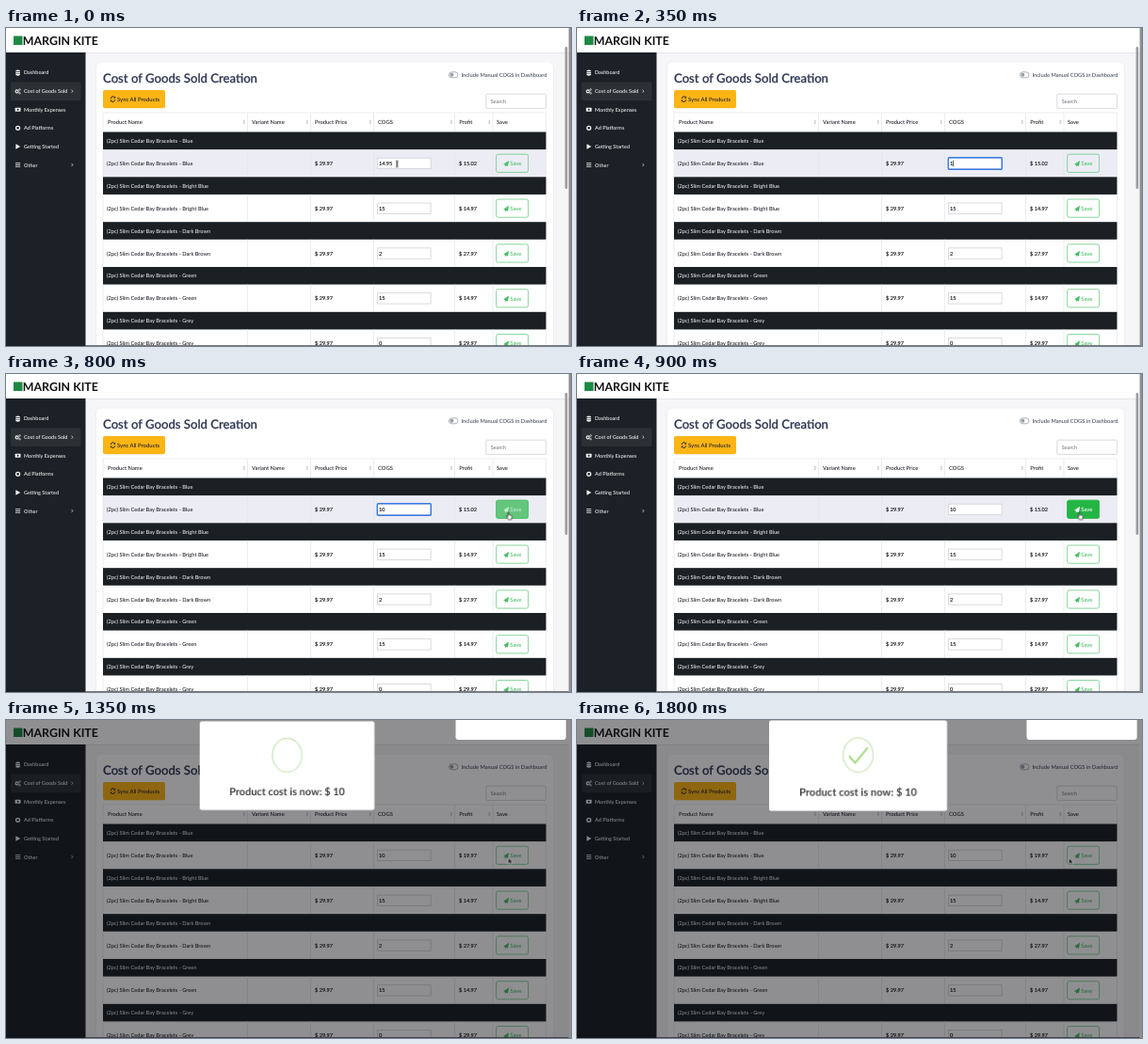
Recreate the animation shown at these times as an HTML page. Size 600x338 px, loop 1850 ms.

```html
<!DOCTYPE html>
<html lang="en">
<head>
<meta charset="utf-8">
<title>Cost of Goods Sold Creation</title>
<style>
  html, body { margin: 0; width: 100%; height: 100%; overflow: hidden; background: #fff; }
  svg { display: block; width: 100vw; height: 100vh; }
  text { font: 500 5.68px Lato, "Open Sans", sans-serif; fill: #1b1e26; text-rendering: geometricPrecision; white-space: pre; }
  .logo { font-size: 12.4px; font-weight: 700; fill: #111; }
  .title { font-size: 13.15px; fill: #2b3450; stroke: #2b3450; stroke-width: .25; }
  .nav text { font-size: 5.5px; fill: #f4f5f6; }
  .head text { font-size: 5.8px; }
  .band { fill: #1b2024; }
  text.group { fill: #e9eaec; }
  .field { fill: #fff; stroke: #cfd1d6; stroke-width: .8; }
  .num { font-size: 5.6px; fill: #14161c; stroke: #14161c; stroke-width: .12; }
  .save { fill: none; stroke: #58c474; stroke-width: .7; }
  .go { fill: #4abf68; font-size: 6px; }
  .hot .save { fill: #24b545; stroke: #24b545; }
  .hot .go { fill: #fff; }
  .grid { stroke: #e4e5e9; stroke-width: .7; fill: none; }
  .alert { font-size: 11.15px; font-weight: 700; fill: #404040; text-anchor: middle; }

  /* One loop is 1850 ms, so 2.7% is one 50 ms step. */
  .anim { animation: 1.85s step-end infinite; }
  .pre { animation-name: pre; }
  .post { animation-name: post; }
  .old { animation-name: old; }
  .new { animation-name: new; }
  .focus { animation-name: focus; }
  .edit { animation-name: edit; }
  .caret { animation-name: caret; }
  .hot { animation-name: hot; animation-timing-function: linear; }
  .pointer { animation-name: move; animation-timing-function: linear; }
  .beam { animation-name: beam; }
  .hand { animation-name: hand; }
  .modal { animation-name: pop; animation-timing-function: linear; transform-origin: 298.5px 48.5px; }
  .tick { animation-name: tick; animation-timing-function: linear; stroke-dasharray: 30; }

  @keyframes pre { 0% { opacity: 1 } 72.95%, 100% { opacity: 0 } }
  @keyframes post { 0% { opacity: 0 } 72.95%, 100% { opacity: 1 } }
  @keyframes old { 0% { opacity: 1 } 24.3%, 100% { opacity: 0 } }
  @keyframes new { 0% { opacity: 0 } 24.3%, 100% { opacity: 1 } }
  @keyframes focus { 0% { opacity: 0 } 2.7% { opacity: 1 } 45.9%, 100% { opacity: 0 } }
  @keyframes edit {
    0% { transform: translateX(14.3px) }
    5.4% { transform: translateX(11.1px) }
    8.1% { transform: translateX(7.8px) }
    10.8% { transform: translateX(6.5px) }
    13.5% { transform: translateX(3.2px) }
    24.3%, 100% { transform: translateX(6.6px) }
  }
  @keyframes caret { 0% { opacity: 0 } 2.7% { opacity: 1 } 32.4%, 100% { opacity: 0 } }
  @keyframes hot { 0%, 37.8% { opacity: 0 } 45.9%, 72.94% { opacity: 1 } 72.95%, 100% { opacity: 0 } }
  @keyframes move {
    0%, 29.7% { transform: translate(415.3px, 144.5px) }
    35.1% { transform: translate(510.5px, 134.5px) }
    37.8% { transform: translate(525px, 141px) }
    40.5%, 89.2% { transform: translate(533.5px, 146.5px) }
    97.2%, 100% { transform: translate(522.5px, 146.7px) }
  }
  @keyframes beam { 0% { opacity: 1 } 5.4%, 100% { opacity: 0 } }
  @keyframes hand { 0% { opacity: 0 } 32.4% { opacity: 1 } 72.95%, 100% { opacity: 0 } }
  @keyframes pop {
    0%, 72.95% { transform: scale(.98) }
    75.7% { transform: scale(1.03) }
    78.4% { transform: scale(.97) }
    81.1%, 100% { transform: scale(1) }
  }
  @keyframes tick {
    0%, 83.7% { stroke-dashoffset: 30; opacity: 0 }
    83.75% { stroke-dashoffset: 30; opacity: 1 }
    94.5%, 100% { stroke-dashoffset: 0; opacity: 1 }
  }
</style>
</head>
<body>
<svg viewBox="0 0 600 338" preserveAspectRatio="none">
  <defs>
    <path id="plane" d="M528.2 144.8 534 141l-1 6-1.8-.8-1.2 1.4-.2-2z"/>
    <path id="sort" d="M-1.2-.6 0-2.4 1.2-.6zM-1.2.6 0 2.4 1.2.6z" fill="#b9bcc4"/>
    <g id="button">
      <rect class="save" x="520.6" y="134.2" width="34" height="19.2" rx="2"/>
      <use href="#plane" class="go"/>
      <text class="go" x="535.2" y="146.1">Save</text>
    </g>
  </defs>

  <rect width="600" height="338" fill="#f6f6f8"/>
  <rect x="95.5" y="36" width="486" height="320" rx="6" fill="#fff" stroke="#ececf0" stroke-width=".8"/>
  <rect width="600" height="26" fill="#fff"/>
  <rect x="84" y="26" width="516" height="1" fill="#e6e6ea"/>
  <rect x="8" y="8.5" width="9.5" height="9.5" fill="#1d8a43"/>
  <text class="logo" x="17.8" y="17.6">MARGIN KITE</text>

  <g class="nav">
    <rect y="26" width="84.5" height="312" fill="#1b2126"/>
    <rect x="5" y="57.5" width="74.5" height="19.5" rx="1.5" fill="#2b3035"/>
    <g id="nav"></g>
    <g fill="#f4f5f6">
      <path d="M10.3 45.2q2.3-1.6 4.6 0v1.1h-4.6zM10.3 46.9h4.6v1.5h-4.6zM10.3 49h4.6v1.1q-2.3 1.4-4.6 0z"/>
      <rect x="9.7" y="84.8" width="5.8" height="4" rx=".5"/>
      <path d="M10.4 123.2 15.3 126l-4.9 2.8z"/>
    </g>
    <circle cx="12.6" cy="86.8" r="1" fill="#1b2126"/>
    <g fill="none" stroke="#f4f5f6">
      <circle cx="11.6" cy="67.4" r="1.5" stroke-width="1.1"/>
      <circle cx="14.5" cy="65.5" r=".8" stroke-width=".7"/>
      <circle cx="14.5" cy="69.2" r=".8" stroke-width=".7"/>
      <circle cx="12.6" cy="106.3" r="2" stroke-width="1.3"/>
      <path d="M10 143.6h5.2M10 145.5h5.2M10 147.4h5.2" stroke-width=".8"/>
      <path d="m69.6 65.6 1.3 1.6-1.3 1.6M69.6 143.9l1.3 1.6-1.3 1.6" stroke-width=".7"/>
    </g>
  </g>

  <text class="title" x="103" y="58.4">Cost of Goods Sold Creation</text>
  <rect x="103" y="66" width="66" height="19.3" rx="2" fill="#fdb515"/>
  <g fill="none" stroke="#2a2a2a" stroke-width="1">
    <path d="M111.2 75a2.4 2.6 0 0 1 4.3-1.2M115.8 76.2a2.4 2.6 0 0 1-4.3 1.2"/>
  </g>
  <path d="M116.2 72.4v2.4h-2.2zM110.8 78.8v-2.4h2.2z" fill="#2a2a2a"/>
  <text x="118" y="77.6" style="font-size:5.95px">Sync All Products</text>

  <rect x="470.4" y="46.8" width="9.6" height="6" rx="3" fill="#fff" stroke="#9a9da6" stroke-width=".8"/>
  <circle cx="473.4" cy="49.8" r="2" fill="#9a9da6"/>
  <text x="483.5" y="51.7" style="font-size:5.75px;fill:#434a5f">Include Manual COGS in Dashboard</text>
  <rect class="field" x="509.8" y="70.2" width="63.6" height="15.2" rx="1"/>
  <text x="514.8" y="79.8" style="font-size:5.5px;fill:#73777f">Search</text>

  <g class="head" id="head"></g>
  <rect class="anim pre" x="103" y="129" width="470.5" height="29.4" fill="#ecedf4"/>
  <g id="rows"></g>

  <text class="num anim pre" x="481" y="146">$ 15.02</text>
  <text class="num anim post" x="481" y="146">$ 19.97</text>
  <text class="num anim old" x="396" y="146">14.95</text>
  <text class="num anim new" x="396" y="146">10</text>
  <g class="anim edit">
    <rect x="396" y="140" width="22" height="8" fill="#fff"/>
    <path class="anim caret" d="M396.4 140.6v6.8" stroke="#111" stroke-width=".8"/>
  </g>
  <rect class="anim focus" x="394.3" y="137.8" width="57" height="12.4" rx="1" fill="none" stroke="#3b7be6" stroke-width="1.5"/>
  <use href="#button"/>
  <g class="anim hot">
    <rect class="save" x="520.6" y="134.2" width="34" height="19.2" rx="2"/>
    <use href="#plane" class="go"/>
    <text class="go" x="535.2" y="146.1">Save</text>
  </g>

  <rect x="593.6" y="20" width="2.6" height="151" rx="1.3" fill="#9c9ca0" class="anim pre"/>
  <rect x="84" y="337.2" width="516" height=".8" fill="#55585c"/>

  <g class="anim post">
    <rect width="600" height="338" fill="#08080c" opacity=".45"/>
    <rect x="477.5" y="-6" width="117.2" height="27" rx="3" fill="#fff"/>
    <g class="anim modal">
      <rect x="204" y=".5" width="189" height="96" rx="2.2" fill="#fff"/>
      <ellipse cx="298.5" cy="37.2" rx="16" ry="18.3" fill="none" stroke="#cfe9bf" stroke-width="1.4"/>
      <path class="anim tick" d="m289.4 38.8 6 6.8 12.8-15.6" fill="none" stroke="#a0d980" stroke-width="2" stroke-linecap="round"/>
      <text class="alert" x="298.5" y="80.3">Product cost is now: $ 10</text>
    </g>
  </g>
  <rect x="597.6" width="2.4" height="338" fill="#8f8f8f"/>

  <g class="anim pointer">
    <path class="anim beam" d="M-1.3-3.4Q0-3.4 0-2.4V2.4Q0 3.4-1.3 3.4M1.3-3.4Q0-3.4 0-2.4V2.4Q0 3.4 1.3 3.4" fill="none" stroke="#222" stroke-width=".8"/>
    <path class="anim hand" d="M-.6.6Q0-.4.6.6V3.2l2.6.7q.9.4.7 1.6L3.3 8.2H.1L-2 5.4q-.3-1 .6-.8l.8.7z" fill="#fff" stroke="#222" stroke-width=".7"/>
    <path class="anim post" d="M0 0V6.4L1.5 5.1 2.5 7.5 3.6 7 2.6 4.7H4.5z" fill="#111" stroke="#fff" stroke-width=".4"/>
  </g>
</svg>
<script>
  const fill = (id, parts) => { document.getElementById(id).innerHTML = parts.join(""); };
  const label = (x, y, s, cls = "") => `<text class="${cls}" x="${x}" y="${y}">${s}</text>`;

  const menu = ["Dashboard", "Cost of Goods Sold", "Monthly Expenses", "Ad Platforms", "Getting Started", "Other"];
  fill("nav", menu.map((s, i) => label(19, 49.4 + i * 19.62, s)));

  const edges = [103, 256.5, 323.5, 390.5, 476.5, 517, 573.5];
  const lines = (top, bottom) =>
    `<path class="grid" d="${edges.map(x => `M${x} ${top}V${bottom}`).join("")}"/>`;

  const heads = [[108, "Product Name"], [261, "Variant Name"], [328, "Product Price"], [395, "COGS"], [481.3, "Profit"], [521, "Save"]];
  fill("head", [
    `<path class="grid" d="M103 90H573.5"/>`,
    lines(90, 110.5),
    ...heads.map(([x, s]) => label(x, 102, s)),
    ...edges.slice(1, 6).map(x => `<use href="#sort" x="${x - 3.7}" y="100"/>`)
  ]);

  const items = [["Blue"], ["Bright Blue", 15, "14.97"], ["Dark Brown", 2, "27.97"], ["Green", 15, "14.97"], ["Grey", 0, "29.97"]];
  fill("rows", items.map(([color, cost, profit], i) => {
    const name = `(2pc) Slim Cedar Bay Bracelets - ${color}`;
    const values = profit
      ? label(396, 146, cost, "num") + label(481, 146, "$ " + profit, "num") + `<use href="#button"/>`
      : "";
    return `<g transform="translate(0 ${i * 47.83})">
      <rect class="band" x="103" y="110.5" width="470.5" height="18.6"/>
      ${lines(129.1, 158.3)}
      ${label(107, 122, name, "group")}
      ${label(107, 146, name)}
      ${label(328, 146, "$ 29.97", "num")}
      <rect class="field" x="394.5" y="138.2" width="56.6" height="11.4"/>
      ${values}</g>`;
  }));
</script>
</body>
</html>
```
